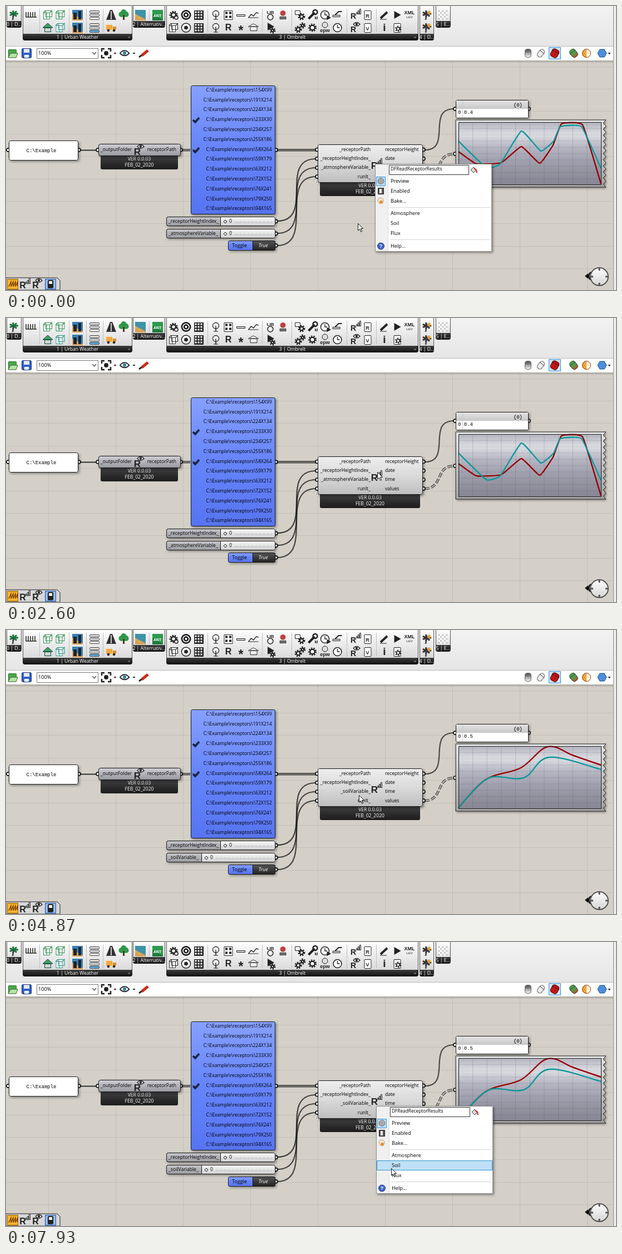
These frames come from a looping animation (1096 px wide and 511 px high, 8 s). An HTML page with a canvas:

```html
<!DOCTYPE html>
<html lang="en">
<head>
<meta charset="utf-8">
<title>Receptor results</title>
<style>
html, body { margin: 0; width: 100%; height: 100%; overflow: hidden; background: #d4d0c8; }
canvas { display: block; }
</style>
</head>
<body>
<canvas width="1096" height="511"></canvas>
<script>
const c = document.querySelector('canvas').getContext('2d');
const UI = '"Open Sans", "Noto Sans", sans-serif';
const SANS = '"Liberation Sans", Arial, sans-serif';
const MONO = '"Liberation Mono", "Courier New", monospace';
const INK = '#222', YELLOW = '#ffffc0';
const BLUE = ['#86a0ff', '#6584fa', '#5674f0'];

// ---- drawing helpers ----
function paint(fill, stroke, w = 1) {
  if (fill) { c.fillStyle = fill; c.fill(); }
  if (stroke) { c.strokeStyle = stroke; c.lineWidth = w; c.stroke(); }
}
function grad(y, h, ...cols) {
  const g = c.createLinearGradient(0, y, 0, y + h);
  cols.forEach((k, i) => g.addColorStop(i / (cols.length - 1), k));
  return g;
}
function box(x, y, w, h, fill, stroke, r = 0) {
  const o = stroke ? .5 : 0;
  c.beginPath();
  c.roundRect(x + o, y + o, w - 2 * o, h - 2 * o, r);
  paint(fill, stroke);
}
function disc(x, y, r, fill, stroke, w) {
  c.beginPath();
  c.arc(x, y, r, 0, 7);
  paint(fill, stroke, w);
}
function trace(p) {
  c.beginPath();
  for (let i = 0; i < p.length; i += 2) c.lineTo(p[i], p[i + 1]);
}
function line(p, stroke = INK, w = 1) { trace(p); paint(null, stroke, w); }
function poly(p, fill = INK, stroke) { trace(p); c.closePath(); paint(fill, stroke); }
function ngon(n, x, y, r, fill, stroke) {
  const p = [];
  for (let i = 0; i < n; i++) p.push(x + r * Math.cos(i * 2 * Math.PI / n), y + r * Math.sin(i * 2 * Math.PI / n));
  poly(p, fill, stroke);
}
function text(s, x, y, size = 8.6, { align = 'left', color = '#000', font = UI, style = '' } = {}) {
  c.font = `${style} ${size}px ${font}`;
  c.textAlign = align;
  c.fillStyle = color;
  c.fillText(s, x, y + size * .34);
}
function at(x, y, draw) { c.save(); c.translate(x, y); draw(); c.restore(); }
function bold(s, x, y, size, color = INK) {
  text(s, x, y, size, { align: 'center', font: SANS, style: 'bold', color });
}
function withShadow(draw) {
  c.save();
  c.shadowColor = 'rgba(0,0,0,.4)'; c.shadowBlur = 4; c.shadowOffsetX = c.shadowOffsetY = 2;
  draw();
  c.restore();
}

// ---- small icons, drawn around 0,0 ----
function eye(x, y, s = 1, iris = INK) {
  at(x, y, () => {
    c.scale(s, s);
    c.beginPath();
    c.moveTo(-6, 0);
    c.quadraticCurveTo(0, -7, 6, 0);
    c.quadraticCurveTo(0, 6, -6, 0);
    paint('#fff', INK, 1.3);
    disc(0, -.3, 2.2, iris);
  });
}
function rIcon(x, y, withEye, size = 16) {
  bold('R', x, y, size);
  if (withEye) eye(x + 6, y - 9);
  else for (let i = 0; i < 3; i++) box(x + 5 + i * 3, y - 7 - i * 3, 3, 4 + i * 3, '#fff', INK);
}
function gear(r, hole = 2) {
  c.setLineDash([2.2, 2]);
  disc(0, 0, r, null, INK, 3);
  c.setLineDash([]);
  disc(0, 0, r - 2, null, INK, 2.5);
  disc(0, 0, hole, '#fff');
}
function palm(color) {
  for (let a = 0; a < 6; a += .9) line([0, -2, 8 * Math.cos(a), 6 * Math.sin(a) - 2], color, 3);
  line([0, -2, -2, 9], '#444', 2.5);
}
function cube(color) {
  box(-8, -4, 12, 12, '#fff', color);
  box(-4, -8, 12, 12, null, color);
  for (const x of [-8, 4]) line([x, -4, x + 4, -8], color, 1.5);
  line([-2, -4, -2, 8], color);
}
function stack(color) {
  for (let i = 0; i < 3; i++) box(-9, -8 + i * 6, 18, 5, i == 2 ? color : '#ddd', '#444', 1);
}
function tiles(n, size, step, color) {
  const o = -((n - 1) * step + size) / 2;
  for (let i = 0; i < n * n; i++) box(o + i % n * step, o + (i / n | 0) * step, size, size, color(i));
}
function picture(sky, ground) {
  box(-9, -9, 19, 19, sky);
  poly([-9, -2, 10, 8, 10, 10, -9, 10], ground);
}
function page(s) {
  box(-6, -8, 13, 17, '#fff', INK, 1);
  bold(s, 0, 2, 9);
}
const ICONS = {
  palm: () => palm('#177a3c'),
  sunPalm() { palm('#333'); disc(4, -4, 3, '#e8a030'); },
  brush() { for (let x = -8; x < 9; x += 4) line([x, -5, x, 4, x + 3, 4], INK, 1.5); },
  cubeG: () => cube('#2f8f4e'), cubeT: () => cube('#2a9a86'), cube: () => cube('#333'),
  house() { poly([-9, 0, 0, -8, 9, 0], '#3aa55a', '#235'); box(-6, 0, 12, 8, '#bfe0c8', '#235'); },
  city() { picture('#3a7db0', '#d9a05a'); box(-7, -4, 6, 12, '#1b2530'); box(2, -7, 5, 15, '#1b2530'); },
  stack: () => stack('#eee'), stackB: () => stack('#58a6dc'),
  road() { poly([-9, 9, -2, -9, 2, -9, 9, 9], '#333'); line([0, -7, 0, 8], '#fff', 1.5); },
  leaf() { for (const x of [-4, 0, 4]) disc(x, Math.abs(x) - 5, 5, '#2c9a4b'); line([0, 0, 0, 9], '#4b3a24', 3); },
  truck() { box(-9, -5, 11, 9, '#f2a93b'); box(3, -2, 6, 6, '#d98a26'); for (const x of [-5, 5]) disc(x, 5, 2.2, INK); },
  shore: () => picture('#3d94a8', '#d9a457'),
  ant() { picture('#2f9a50', '#1f7a3c'); bold('ANT', 0, 2, 7, '#fff'); },
  gears() { gear(6); disc(5, 5, 3, '#fff', INK, 1.5); },
  wheel() { disc(0, 0, 9, INK); disc(0, 0, 5.5, null, '#fff', 1.5); disc(0, 0, 2, '#fff'); },
  ball() { disc(0, 0, 8, '#fff', INK, 1.5); ngon(5, 0, 0, 4, INK); },
  grid() { box(-8, -8, 17, 17, INK); tiles(3, 3, 5, () => '#fff'); },
  tree() { disc(0, -2, 5.5, '#fff', INK, 1.3); line([0, -2, 0, 8], INK, 1.5); line([-4, 8, 4, 8]); },
  tower() { box(-8, -8, 16, 17, '#fff', INK); tiles(2, 4, 7, () => INK); },
  dash() { box(-8, -1, 16, 4, '#ddd', INK); },
  hills() { line([-9, 5, -4, -1, 0, 2, 5, -4, 9, -3], INK, 1.3); line([-9, 5, 9, 5]); },
  lib() { bold('LIB', 0, -5, 8); disc(0, 4, 5, null, INK, 1.5); },
  rose() { disc(0, -3, 5, '#b94545'); box(-6, 3, 12, 5, '#777', '#333'); },
  hut() { poly([-9, -2, 0, -7, 9, -2], '#fff', INK); box(-6, -2, 13, 8, '#fff', INK); },
  star: () => bold('*', 0, 5, 23),
  r: () => bold('R', 0, 0, 16),
  run() { ngon(3, -1, -2, 8); at(4, 5, () => gear(4, 1)); },
  flow() { box(-9, -8, 10, 8, '#fff', INK); at(3, 3, () => gear(5)); },
  wrench() { line([-7, 7, 4, -4], INK, 4); disc(5, -5, 4, null, INK, 2.5); bold('M', 7, 6, 7); },
  clock() { disc(0, 0, 7.5, '#fff', INK, 1.5); line([0, -5, 0, 0, 4, 0], INK, 1.3); },
  clockRun() { ICONS.clock(); ngon(3, 6, 5, 5); },
  plane() { box(-9, 0, 14, 4, '#ddd', INK); line([-4, 0, 2, -6, 8, -6], INK, 2); },
  pair() { at(-3, 3, () => gear(5)); at(5, -4, () => gear(4, 1)); },
  sun: () => gear(6, 3),
  epw() { disc(0, -5, 5, '#ddd', INK); bold('epw', 0, 5, 9); },
  rBars: () => rIcon(-3, 2, false, 14),
  rEye: () => rIcon(-3, 3, true, 14),
  pageR: () => page('R'), pageV: () => page('V'),
  pen() { line([-7, 6, 5, -5], INK, 4); line([-8, 8, 4, 8]); },
  play: () => ngon(3, -1, 0, 8),
  xml() { bold('XML', 0, -4, 9); bold('LEV', 0, 4, 6, '#666'); },
  info: () => bold('i', 0, 0, 19),
  pageGear() { page(''); at(2, 2, () => gear(4)); },
  check: () => tiles(5, 3.4, 3.4, i => i % 2 ? '#fff' : '#ccc')
};

// ---- window chrome ----
// Each section: centre of its first column, then its icons row by row.
const GROUPS = [
  { x: 1, w: 27, name: '0 | D...', sections: [[14, 'palm']] },
  { x: 30, w: 197, tall: true, name: '1 | Urban Weather', sections: [[44, 'brush'], [75, 'cubeG cubeG', 'house cubeT'],
    [128, 'city', 'city'], [159, 'stack', 'stackB'], [189, 'road leaf', 'truck']] },
  { x: 228, w: 58, name: '2 | Alternativ...', sections: [[241, 'shore'], [272, 'ant']] },
  { x: 288, w: 453, tall: true, name: '3 | Ombrelt', sections: [[301, 'gears wheel grid', 'cube ball grid'],
    [377, 'tree tower dash hills', 'tree r star hut'], [475, 'lib rose', 'run'],
    [528, 'flow wrench clockRun plane', 'pair sun epw clock'], [627, 'rBars pageR', 'rEye pageV'],
    [680, 'pen play xml', 'info pageGear']] },
  { x: 743, w: 26, tall: true, name: '4 | D...', sections: [[756, 'sunPalm', 'sunPalm']] },
  { x: 772, w: 27, name: '5 | E...', sections: [[785, 'check']] }
];
function ribbon() {
  box(0, 0, 1096, 73, grad(0, 73, '#f2f2f2', '#e6e6e6'));
  for (const { x, w, tall, name, sections } of GROUPS) {
    const h = tall ? 62 : 39;
    box(x, -5, w, h + 5, grad(0, h, '#fdfdfd', '#d2d2d2'), '#555', 4);
    box(x, h - 12, w, 12, grad(h - 12, 12, '#3c3c3c', '#111'), null, [0, 0, 4, 4]);
    text(name, x + w / 2, h - 6, 8.6, { align: 'center', color: '#fff' });
    if (w > 100) text('+', x + w - 6, h - 6, 8, { align: 'center', color: '#ccc' });
    sections.forEach(([sx, ...rows], k) => {
      if (k) line([sx - 14.5, 5, sx - 14.5, h - 14], '#c0c0c0');
      rows.forEach((row, j) => row.split(' ').forEach((id, i) => at(sx + i * 22.5, 16 + j * 23, ICONS[id])));
    });
  }
}
function triangle(x) { poly([x - 2.5, 84, x + 2.5, 84, x, 87]); }
function cylinder(x, angle, color, edge, size = 6) {
  at(x, 85, () => { c.rotate(angle); box(-size, -8, size * 2, 16, color, edge, 4); line([-size, -3, size, -3], edge); });
}
function toolbar() {
  box(0, 72, 1091, 26, '#fff');
  line([0, 72.5, 1091, 72.5], '#bbb');
  box(4, 78, 15, 15, '#4aa84a', '#256b25', 1);
  poly([4, 93, 8, 85, 21, 85, 18, 93], '#b7e3a6', '#256b25');
  box(28, 76, 18, 18, '#2f62c8', '#16307a', 2);
  box(32, 77, 10, 7, '#dfe8fa'); box(33, 88, 8, 5, '#fff');
  box(55, 76, 111, 19, '#fff', '#7a7a7a');
  text('100%', 58, 85, 9.2);
  line([155, 83, 158.5, 87, 162, 83], '#444', 1.2);
  for (const x of [-1, 1]) for (const y of [-1, 1])
    at(180, 85, () => { c.scale(x, y); line([3, 8, 8, 8, 8, 3], INK, 2.5); });
  disc(180, 85, 4, INK);
  eye(213, 85, 1.4, '#2f7fb0');
  line([239, 92, 246, 87], INK, 3);
  line([244, 89, 255, 80], '#c62f1c', 5);
  cylinder(938, 0, grad(-8, 16, '#444', '#fff'), '#666');
  cylinder(961, .7, '#eee', '#555', 5);
  box(975, 74, 22, 22, '#cce6fb', '#2f8fdc');
  cylinder(986, .5, '#c01818', '#5c0808', 7);
  cylinder(1020, -.7, grad(-8, 16, '#4ca83c', '#4ca83c', '#d04030'), '#345');
  disc(1043, 85, 7.5, '#f2a23a', '#6b3a10');
  c.beginPath(); c.arc(1043, 85, 7, -1.57, 1.57); paint('#fff0d8');
  ngon(6, 1071, 85, 8, '#4d90dc', '#1d3f7a');
  [196, 230, 1084].forEach(triangle);
}
function corners() {
  poly([0, 489, 92, 489, 97, 494, 97, 511, 0, 511], '#d8d8d8', INK);
  box(2, 491, 20, 19, '#ffb52e', '#8a5a00');
  for (let x = 5; x < 19; x += 4) line([x, 505, x + 4, 496, x + 4, 504], '#7a4300', 1.5);
  rIcon(30, 503, false);
  rIcon(53, 503, true);
  box(70, 491, 20, 19, '#8fb8f4', '#2454b0');
  box(75, 493, 10, 15, '#222', null, 2); box(77, 495, 6, 5, '#fff');
  poly([1040, 486, 1046, 481, 1046, 491], '#111');
  c.beginPath(); c.arc(1055, 486, 8, 2.2, 4.2); paint(null, '#111', 2.5);
  at(1066, 487, () => {
    disc(0, 0, 16, grad(-16, 32, '#fff', '#d4d4d4'), '#555', 2);
    for (let i = 0; i < 4; i++) { c.rotate(Math.PI / 2); line([11, 0, 16, 0], '#555', 3); }
  });
}

// ---- node graph ----
function wire(x0, y0, x1, y1, bend) {
  const h = (x1 - x0) * bend;
  c.beginPath();
  c.moveTo(x0, y0);
  c.bezierCurveTo(x0 + h, y0, x1 - h, y1, x1, y1);
}
function grips(x, ...ys) { for (const y of ys) disc(x, y, 3, '#fff', '#000', 1.5); }
function capsule(x, y, w, h, cols, r = 3) {
  withShadow(() => box(x, y, w, h, grad(y, h, ...cols), null, r));
  box(x, y, w, h, null, '#1c1c1c', r);
}
function version(x, y, w) {
  box(x, y, w, 25, grad(y, 25, '#404040', '#1c1c1c'), null, [0, 0, 3, 3]);
  ['VER 0.0.03', 'FEB_02_2020'].forEach((s, i) => text(s, x + w / 2, y + 6 + i * 11.5, 8.6, { align: 'center', color: '#fff' }));
}
function slider(y, name, split) {
  grips(485, y + 8.5);
  capsule(288, y, 196, 17, ['#fafafa', '#cfcfcf']);
  box(288, y, split - 288, 17, grad(y, 17, '#c6c6cc', '#9a9aa2'), '#1c1c1c', [3, 0, 0, 3]);
  text(name, 292, y + 8);
  line([split + 24, y + 10.5, 478, y + 10.5], '#c2c2c2');
  for (let x = 477.5; x > split + 24; x -= 7) line([x, y + 8, x, y + 11], '#c2c2c2');
  ngon(4, split + 8, y + 9, 3, '#fff', '#000');
  text('0', split + 15, y + 8);
}

// Key points only; the curve runs smoothly through them.
const ATMO = {
  bend: .06,
  red: [[813, 262], [845, 284], [890, 282], [926, 253], [959, 283], [983, 250], [998, 212], [1036, 214], [1069, 320]],
  teal: [[813, 243], [863, 291], [888, 284], [926, 225], [961, 261], [984, 243], [996, 217], [1034, 217], [1069, 292]]
};
const SOIL = {
  bend: .17,
  red: [[813, 320], [862, 269], [925, 248], [973, 210], [1020, 226], [1069, 243]],
  teal: [[813, 320], [866, 267], [930, 266], [976, 229], [1069, 251]]
};
function curve(p, bend, color) {
  c.beginPath();
  c.moveTo(...p[0]);
  for (let i = 1; i < p.length; i++) {
    const a = p[i - 1], b = p[i], before = p[i - 2] || a, after = p[i + 1] || b;
    c.bezierCurveTo(a[0] + (b[0] - before[0]) * bend, a[1] + (b[1] - before[1]) * bend,
      b[0] - (after[0] - a[0]) * bend, b[1] - (after[1] - a[1]) * bend, ...b);
  }
  paint(null, color, 2.4);
}
function plot({ red, teal, bend }) {
  const edge = [808, 205];
  for (let i = 0; i <= 22; i++) edge.push(i % 2 ? 1073 : 1078, 205 + i * 5.5);
  edge.push(808, 326);
  withShadow(() => poly(edge, grad(205, 121, '#e2e2e2', '#a4a4a4')));
  poly(edge, null, INK);
  box(813, 209, 257, 113, grad(209, 113, '#b4b4c0', '#dcdce2', '#b6b6c2', '#a2a2b0', '#92929f', '#868694'));
  for (let x = 838.5; x < 1070; x += 25.7) line([x, 209, x, 322], 'rgba(70,60,100,.2)');
  for (let y = 220.5; y < 322; y += 11.3) line([813, y, 1070, y], 'rgba(70,60,100,.15)');
  curve(red, bend, '#960000');
  curve(teal, bend, '#0a9a9a');
  box(813, 209, 257, 113, null, INK);
}
const RECEPTORS = '154X99 191X214 224X134 233X30 234X257 255X186 58X264 59X179 63X212 72X152 76X241 79X250 94X165'.split(' ');
function graph(soil) {
  const variable = soil ? '_soilVariable_' : '_atmosphereVariable_';
  box(0, 98, 1091, 413, '#d4d0c8');
  for (let x = 76.5; x < 1091; x += 121) line([x, 98, x, 511], 'rgba(0,0,0,.08)');
  for (let y = 109; y < 511; y += 40.4) line([0, (y | 0) + .5, 1091, (y | 0) + .5], 'rgba(0,0,0,.08)');
  box(0, 98, 1091, 5, grad(98, 5, 'rgba(0,0,0,.22)', 'rgba(0,0,0,0)'));

  line([132, 259.5, 164, 259.5], '#333', 2);
  for (const y of [258, 260.5]) for (const [a, b] of [[316, 331], [486, 558]]) line([a, y, b, y], INK, 1.4);
  for (let i = 0; i < 3; i++) { wire(487, 387 + i * 22, 557, 275 + i * 16, .97); paint(null, 'rgba(25,25,25,.78)', 2.2); }
  wire(752, 259, 805, 185, .95); paint(null, '#484848', 2.2);
  wire(752, 307, 805, 266, .65);
  c.setLineDash([9, 3]);
  paint(null, '#484848', 4.5); paint(null, '#b9b6b0', 2);
  c.setLineDash([]);

  grips(4, 259); grips(131, 259);
  capsule(5, 242, 125, 36, ['#fff', '#fff']);
  text('C:\\Example', 63.5, 260, 9, { align: 'center', font: MONO });

  grips(165, 259); grips(314, 259);
  version(170, 269, 139);
  capsule(166, 248, 148, 22, ['#cfcfd4', '#97979f']);
  text('_outputFolder', 170, 258);
  text('receptorPath', 306, 258, 8.6, { align: 'right' });
  rIcon(236, 262, true, 17);

  grips(485, 259);
  capsule(332, 143, 152, 232, BLUE);
  RECEPTORS.forEach((s, i) => text('C:\\Example\\receptors\\' + s, 477.5, 151 + i * 17.8, 8.5, { align: 'right' }));
  for (const y of [205, 259]) line([336, y, 340, y + 4, 347, y - 4], '#1c2440', 3.6);

  slider(379, '_receptorHeightIndex_', 386);
  slider(401, variable, soil ? 352 : 386);
  grips(485, 431);
  capsule(399, 422, 85, 18, BLUE);
  box(443, 422, 41, 18, grad(422, 18, '#555', '#222'), '#111', [0, 3, 3, 0]);
  text('Toggle', 406, 430.5, 9);
  text('True', 462, 430.5, 9, { align: 'center', color: '#fff', style: 'italic' });

  const row = i => 258.5 + i * 16.2;
  for (const x of [559, 750]) grips(x, row(0), row(1), row(2), row(3));
  version(564, 317, 180);
  capsule(560, 249, 189, 69, ['#efefef', '#dadada', '#bebebe']);
  ['_receptorPath', '_receptorHeightIndex_', variable, 'runIt_'].forEach((s, i) => text(s, 655, row(i) - .5, 8.6, { align: 'right' }));
  ['receptorHeight', 'date', 'time', 'values'].forEach((s, i) => text(s, 681, row(i) - .5));
  rIcon(662, 287, false, 17);

  grips(807, 185, 266); grips(939, 185);
  capsule(808, 169, 131, 33, ['#fff', '#fff'], 2);
  box(809, 170, 129, 15, grad(170, 15, '#e4e4e4', '#c6c6c6'));
  line([820.5, 171, 820.5, 200], '#c4c4c4');
  text('{0}', 928, 177.5, 9, { align: 'right', font: MONO });
  text('0 ' + (soil ? '0.5' : '0.4'), 812, 191, 9, { font: MONO });
  plot(soil ? SOIL : ATMO);
}

// ---- overlays ----
function panel(x, y, w, h, fill, stroke) {
  withShadow(() => box(x, y, w, h, fill));
  box(x, y, w, h, null, stroke);
}
function inherited(x, y) {
  box(x, y, 183, 25, '#ece9a6', '#8a8850');
  ['1 value inherited from 1 source…', '0'].forEach((s, i) => text(s, x + 4, y + 7 + i * 10, 9, { font: MONO }));
}
function notes(lines, x, y) { lines.forEach((s, i) => text(s, x, y + i * 9.78, 8.8, { font: SANS })); }
const VARIABLES = `AirTemperature °C|DiffTemperature °C/h|SpecificHumidity g/kg|RelativeHumidity %|VerticalExchangeCoefficient m²/s|VerticalKmNormed -|HorizontalExchangeCoefficient m²/s|TurbulentKineticEnergy m²/s²|DissipationTKE m³/s²|MeanRadiantTemperature °C|LeafAreaDensity m²/m³|LeafFoliageTemperature °C|SensibleHeatFluxFromLeaf W/m²2|LatentHeatFluxFromLeaf W/m²2|StomataResistance m/s|CO2 mg/m³|CO2Flux mg/(kg*s)|ShortwaveDirectRadiation W/m²|ShortwaveDiffuseRadiation W/m²|PressurePerturbation Pa|MassConcentration mg/m³|MechanicalProductionTKE -|AirTemperatureChangeLongwave K/h|SkyViewFactorBuilding|SkyViewFactorBuildingLeaf -`.split('|');
function atmoTip() {
  panel(650, -9, 190, 284, YELLOW, INK);
  notes(VARIABLES.map((s, i) => `${i == 24 ? ' -' : ''}${i + 2} = ${s}`), 656, -1.8);
  inherited(654, 247);
}
function soilTip() {
  panel(658, 321, 190, 108, YELLOW, INK);
  box(659, 322, 188, 26, grad(322, 26, '#ffc94e', '#ffd873'));
  line([658, 348.5, 848, 348.5], INK);
  ngon(6, 672, 334.5, 10, '#151515');
  bold('7', 672, 334.5, 12, '#fff');
  text('_soilVariable_', 692, 334.5, 11, { font: SANS, style: 'italic' });
  notes(['Connect a number:', '0 = Temperature °C', '1= VolumeWaterContent m3/m-3', '2 = TemperatureDiffusifity *10e6'], 664, 357.5);
  inherited(662, 400);
}
const ITEMS = ['Preview', 'Enabled', 'Bake...', 'Atmosphere', 'Soil', 'Flux', 'Help...'];
function menu(x, y, mouse) {
  const rowY = i => 31 + i * 17.8 + 4.8 * ((i > 2) + (i > 5));
  const over = ITEMS.findIndex((s, i) => mouse[0] > x && Math.abs(mouse[1] - y - rowY(i)) < 8.9);
  at(x, y, () => {
    panel(0, 0, 210, 158, '#fff', '#909090');
    box(1, 1, 23, 156, '#f0f0f0');
    line([23.5, 1, 23.5, 157], '#dcdcdc');
    if (over >= 0) box(1, Math.round(rowY(over)) - 9, 208, 18, '#bfe0f6', '#3294d0');
    box(25, 2, 144, 18, '#fff', '#333');
    text('DFReadReceptorResults', 28, 9, 8.3);
    ngon(4, 177, 11, 5, '#ddd', '#333');
    line([178, 8, 182, 11, 183, 16], '#c0392b', 2.2);
    ITEMS.forEach((s, i) => text(s, 28, rowY(i), 9.2));
    for (const ly of [78.5, 136.5]) line([27, ly, 207, ly], '#d4d4d4');
    box(2, 23, 17, 17, '#bfe2fa', '#3294d8');
    disc(10.5, 31, 5.5, '#a9a9a9', '#777');
    box(5, 43, 11, 12, '#555', INK); box(8, 45, 4, 8, '#eee');
    disc(10, 66, 5, '#f6e9d2', '#c99a5a'); disc(11, 69, 3, '#e88c2e');
    disc(10.5, 148, 6, '#3d62c8', '#24408c'); bold('?', 10.5, 148, 9, '#fff');
  });
}
function pointer([x, y]) {
  at(x, y, () => poly([.5, .5, .5, 13, 3.5, 10.3, 5.6, 15.4, 7.6, 14.5, 5.5, 9.6, 9.5, 9.4], '#fff', '#111'));
}

// ---- timeline, in steps of 1/15 s ----
// Pointer moves: first step, last step, goal.
const MOVES = [[0, 6, 627, 291], [26, 39, 667, 277], [47, 60, 691, 385], [65, 73, 634, 297],
  [93, 103, 672, 294], [106, 107, 664, 294], [110, 119, 692, 407]];
function mouseAt(n) {
  let x = 632, y = 391;
  for (const [from, to, gx, gy] of MOVES) {
    const u = Math.min(1, Math.max(0, (n - from) / (to - from)));
    const e = 1 - (1 - u) ** 1.5;
    x += (gx - x) * e;
    y += (gy - y) * e;
  }
  return [Math.round(x), Math.round(y)];
}
function draw(ms) {
  const n = Math.floor((ms + 5) * .015) % 120;
  const within = (a, b) => n >= a && n < b;
  const mouse = mouseAt(n);
  graph(n >= 66);
  corners();
  ribbon();
  toolbar();
  box(1091, 0, 5, 511, '#ececec');
  line([1091.5, 0, 1091.5, 511], '#8c8c8c');
  if (within(0, 1)) menu(663, 284, mouse);
  if (within(12, 29)) atmoTip();
  if (within(44, 64)) menu(667, 279, mouse);
  if (within(78, 95)) soilTip();
  if (n >= 111) menu(665, 295, mouse);
  pointer(mouse);
}
let start;
function tick(now) {
  start ??= now;
  draw(now - start);
  requestAnimationFrame(tick);
}
draw(0);
requestAnimationFrame(tick);
</script>
</body>
</html>
```
